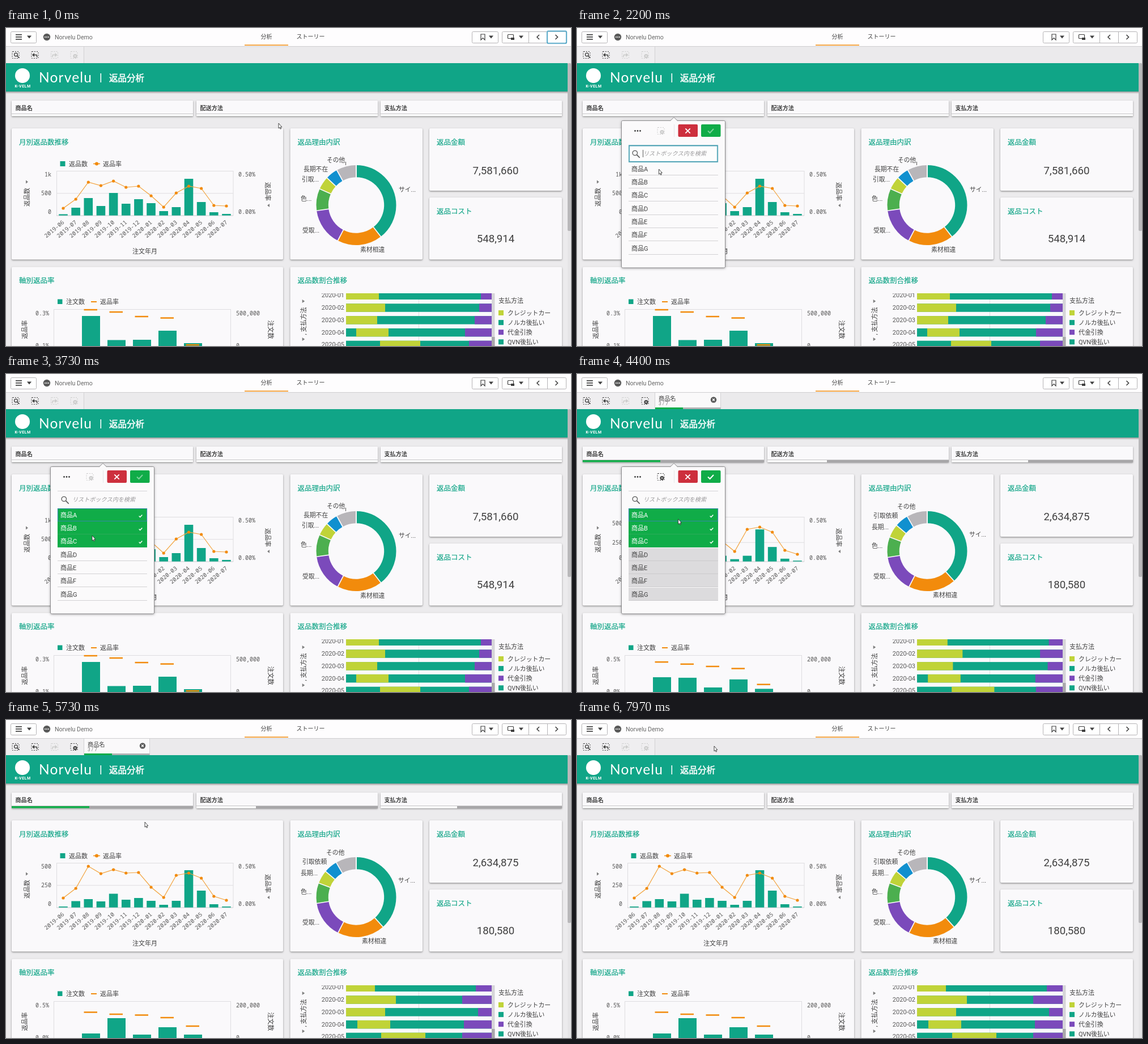
These frames come from a looping animation (997x561 px, 8000 ms). An HTML page with a canvas:

```html
<!DOCTYPE html>
<html lang="ja">
<head>
<meta charset="utf-8">
<title>返品分析</title>
<style>
html, body { margin: 0; width: 100%; height: 100%; overflow: hidden; background: #ecebed; }
canvas { display: block; width: 997px; height: 561px; }
</style>
</head>
<body>
<canvas id="stage" width="997" height="561"></canvas>
<script>
const ctx = document.getElementById('stage').getContext('2d');
const LOOP = 8000;
const SANS = 'Roboto, "Noto Sans CJK JP", "Noto Sans CJK", sans-serif';
const MONO = '"Noto Sans Mono", monospace';
const BRAND = 'Lato, sans-serif';
const GREEN = '#10a587', ORANGE = '#f28b0c', PURPLE = '#7b4abb', LIME = '#c0d338';
const PICK = '#10ac48', INK = '#404040', SOFT = '#595959', CARD = '#faf9fb', GRID = '#dedde0';

// Moments of the interaction, in ms
const T = { blur: 900, open: 970, list: 1200, pickA: 3020, pickB: 3450, pickC: 3680,
  apply: 4000, top: 4060, bottom: 4220, close: 5080, hoverOn: 5900, hoverOff: 6450, clear: 7680 };

const PATH = [[0, 481, 168], [180, 481, 168], [820, 143, 134], [1300, 143, 134], [2130, 144.5, 249],
  [3370, 144.5, 249], [3690, 152, 285], [4200, 152, 285], [4780, 248, 180], [5450, 248, 180],
  [5750, 245, 180], [6380, 245, 180], [6660, 241, 41], [7740, 241, 41], [7900, 242, 46]];

const combo = {
  barA: [328.5, 317, 300, 314, 291, 310, 302, 309, 323, 316, 266, 307, 325, 328],
  barB: [329, 319.5, 316, 320, 306.5, 317, 314, 319, 326, 319, 265, 301, 325, 329],
  lineA: [318, 302, 272, 278, 270, 281, 279, 296, 316, 291, 279, 283, 313, 314],
  lineB: [314, 297, 258, 271, 264, 270, 269, 295, 313, 274, 270, 279, 311, 318]
};
const axisBars = {
  barA: [508, 550.5, 550, 534, 556], barB: [553, 526, 555, 542, 555],
  markA: [497, 501, 509, 511.5, 559], markB: [515.5, 519, 520.5, 525, 540]
};
const stackA = [[600, 658, 838], [600, 669, 835], [600, 655, 827], [618, 675, 810], [660, 731, 817]];
const stackB = [[600, 651, 829], [600, 688, 805], [600, 669, 833], [620, 678, 808], [662, 740, 805]];
const pieA = [0, 142, 207.5, 262, 294, 313, 331, 360];
const pieB = [0, 138, 207, 261, 290.5, 310, 330, 360];
const pieColors = [GREEN, ORANGE, PURPLE, '#4caf4f', LIME, '#1190cf', '#b8b6ba'];
const pieTextA = [['その他', 566, 233], ['長期不在', 525, 249], ['引取...', 522, 267], ['色...', 520, 301],
  ['受取...', 523, 357], ['素材相違', 625, 391], ['サイ...', 693, 285]];
const pieTextB = [['その他', 565, 234], ['引取依頼', 523, 250], ['長期...', 520, 270], ['色...', 520, 303],
  ['受取...', 523, 357], ['素材相違', 628, 390], ['サイ...', 692, 283]];

const mix = (a, b, k) => a + (b - a) * k;
const ramp = (t, start, len) => Math.max(0, Math.min(1, (t - start) / len));
const ease = k => k * k * (3 - 2 * k);

function rect(x, y, w, h, color) {
  ctx.fillStyle = color;
  ctx.fillRect(x, y, w, h);
}

function box(x, y, w, h, r, fill, stroke, lw = 1) {
  ctx.beginPath();
  ctx.roundRect(x, y, w, h, r);
  if (fill) { ctx.fillStyle = fill; ctx.fill(); }
  if (stroke) { ctx.strokeStyle = stroke; ctx.lineWidth = lw; ctx.stroke(); }
}

function disc(x, y, r, color) {
  ctx.beginPath();
  ctx.arc(x, y, r, 0, Math.PI * 2);
  ctx.fillStyle = color;
  ctx.fill();
}

function line(points, color, lw = 1) {
  ctx.beginPath();
  points.forEach(([x, y]) => ctx.lineTo(x, y));
  ctx.strokeStyle = color;
  ctx.lineWidth = lw;
  ctx.stroke();
}

function poly(points, color) {
  ctx.beginPath();
  points.forEach(([x, y]) => ctx.lineTo(x, y));
  ctx.closePath();
  ctx.fillStyle = color;
  ctx.fill();
}

// y is the vertical middle of the text
function text(s, x, y, size, o = {}) {
  ctx.font = `${o.style || ''} ${o.weight || 400} ${size}px ${o.font || SANS}`;
  ctx.textAlign = o.align || 'left';
  ctx.letterSpacing = (o.gap || 0) + 'px';
  ctx.fillStyle = ctx.strokeStyle = o.color || INK;
  ctx.fillText(s, x, y + size * 0.37);
  if (o.thick) {
    ctx.lineWidth = o.thick;
    ctx.strokeText(s, x, y + size * 0.37);
  }
}

function turned(s, x, y, size, deg, o = {}) {
  ctx.save();
  ctx.translate(x, y);
  ctx.rotate(deg * Math.PI / 180);
  text(s, 0, 0, size, { align: 'center', ...o });
  ctx.restore();
}

const caret = (x, y, dx, color = '#808080') => poly([[x - dx, y - 3], [x + dx, y], [x - dx, y + 3]], color);
const drop = (x, y) => poly([[x - 4, y - 2.5], [x + 4, y - 2.5], [x, y + 2.5]], INK);
const cross = (x, y, r, color, lw) => {
  line([[x - r, y - r], [x + r, y + r]], color, lw);
  line([[x + r, y - r], [x - r, y + r]], color, lw);
};
const check = (x, y, s, color, lw) => line([[x - s, y], [x - s * 0.3, y + s * 0.7], [x + s, y - s * 0.7]], color, lw);

function shadowed(x, y, w, h, r = 2) {
  ctx.save();
  ctx.shadowColor = 'rgba(0,0,0,.42)';
  ctx.shadowBlur = 3;
  ctx.shadowOffsetY = 1.2;
  box(x, y, w, h, r, CARD);
  ctx.restore();
}

function card(x, y, w, h, title) {
  shadowed(x, y, w, h);
  text(title, x + 13, y + 24, 12.5, { color: GREEN, thick: 0.2 });
}

function lens(x, y, r, color) {
  ctx.beginPath();
  ctx.arc(x, y, r, 0, Math.PI * 2);
  ctx.strokeStyle = color;
  ctx.lineWidth = 1.3;
  ctx.stroke();
  line([[x + r * 0.7, y + r * 0.7], [x + r * 2, y + r * 2]], color, 1.6);
}

function dashed(x, y, color) {
  ctx.setLineDash([2, 2]);
  box(x - 6, y - 6, 12, 12, 1, null, color, 1);
  ctx.setLineDash([]);
}

function clearIcon(x, y, on) {
  const color = on ? INK : '#cbcbcb';
  dashed(x, y, color);
  disc(x + 2, y + 2, 3.6, color);
  cross(x + 2, y + 2, 1.4, '#f4f4f4', 1);
}

function stepIcon(x, y, dir, color) {
  dashed(x, y, color);
  rect(x - 4, y - 3, 9, 7, '#ededed');
  line([[x - 2 * dir, y], [x + 3 * dir, y], [x + 4 * dir, y + 4]], color, 1.5);
  poly([[x - 5 * dir, y], [x - dir, y - 3.5], [x - dir, y + 3.5]], color);
}

function expandIcon(x, y) {
  for (const d of [1, -1]) {
    line([[x + 2.2 * d, y - 2.2 * d], [x + 5 * d, y - 5 * d]], INK, 1.3);
    poly([[x + 6 * d, y - 6 * d], [x + 6 * d, y - 2.5 * d], [x + 2.5 * d, y - 6 * d]], INK);
  }
}

function drawHeader(t, filtered) {
  rect(0, 0, 997, 32, '#fefdfe');
  rect(0, 32, 997, 1, '#cfced0');
  const edge = '#b5b4b6';
  box(8.5, 6.5, 45, 20, 2, '#fff', edge);
  for (const y of [11, 15, 19]) rect(17, y, 11, 1.7, INK);
  drop(41, 16);
  disc(72, 16, 6.2, SOFT);
  for (const x of [69, 72, 75]) disc(x, 16, 1, '#fff');
  text('Norvelu Demo', 86, 16, 10.6, { color: '#666' });
  text('分析', 459.5, 15.5, 10, { align: 'center' });
  text('ストーリー', 537.5, 15.5, 10, { align: 'center' });
  rect(421, 29.5, 77, 1.5, ORANGE);

  box(822.5, 6.5, 46, 20, 2, '#fff', edge);
  ctx.lineJoin = 'miter';
  line([[838, 11], [845, 11], [845, 21], [841.5, 17.5], [838, 21], [838, 10.5]], INK, 1.2);
  drop(856, 16);
  box(875.5, 6.5, 113, 20, 2, '#fff', edge);
  rect(922, 7, 1, 19, edge);
  rect(955, 7, 1, 19, edge);
  box(885.5, 11.5, 10, 7, 1, null, INK, 1.2);
  rect(891, 17, 6, 4, INK);
  drop(909, 16);
  line([[941, 12], [937, 16], [941, 20]], INK, 1.6);
  line([[969.5, 12], [973.5, 16], [969.5, 20]], INK, 1.6);
  if (t < T.blur) {
    box(955, 5.5, 34, 21.5, 2, null, '#a9d4e6', 2.4);
    box(955, 5.5, 34, 21.5, 2, null, '#3797b9', 1.2);
  }

  rect(0, 33, 997, 29, '#ebeaec');
  rect(0, 33, 137, 29, '#efeef0');
  rect(137, 33, 1, 29, '#d2d1d3');
  dashed(17, 47.5, INK);
  lens(17.5, 47, 2.8, INK);
  stepIcon(51, 47.5, 1, INK);
  stepIcon(85.5, 47.5, -1, '#cbcbcb');
  clearIcon(120, 47.5, filtered);
  if (filtered) {
    rect(138, 33, 115.5, 29, '#faf9fa');
    rect(253, 33, 1, 29, '#d2d1d3');
    text('商品名', 144, 43, 10.2);
    text('3 / 7', 144, 52, 8.4, { color: '#777' });
    disc(241, 45.5, 5.2, SOFT);
    cross(241, 45.5, 2, '#fff', 1.3);
    rect(138, 59, 49.5, 3, PICK);
    rect(187.5, 59, 66, 3, '#b3b2b4');
  }
}

function drawBanner() {
  rect(0, 62, 991, 50, GREEN);
  const shade = ctx.createLinearGradient(0, 112, 0, 116);
  shade.addColorStop(0, 'rgba(0,0,0,.35)');
  shade.addColorStop(1, 'rgba(0,0,0,0)');
  rect(0, 112, 991, 4, shade);
  disc(29, 84, 13, '#fff');
  text('K-VELM', 29.5, 102, 7, { color: '#fff', align: 'center', weight: 700, gap: 0.5 });
  text('Norvelu', 58, 87, 24.5, { color: '#fff', font: BRAND, gap: 1.2 });
  rect(166.5, 80, 1.6, 16, '#fff');
  text('返品分析', 182, 88, 15.5, { color: '#fff', thick: 0.5 });
  rect(991, 62, 6, 499, '#e6e5e7');
  box(991, 62, 6, 296, 2, '#b9b8ba');
}

function drawFilters(t, filtered) {
  [['商品名', 10, 147], ['配送方法', 336, 441], ['支払方法', 661, 796]].forEach(([name, x, split], i) => {
    shadowed(x, 128, 320, 27.5, 1);
    text(name, x + 6.5, 141, 10.1, { weight: 700 });
    rect(x, 151, 320, 1, '#c4c3c5');
    rect(x, 152, 320, 3, '#fff');
    if (filtered) {
      rect(split, 152, x + 320 - split, 4, '#a7a6a8');
      rect(x, 152, split - x, 3.5, i ? '#fdfdfd' : PICK);
    }
  });
  if (t > 720 && t < 1180) expandIcon(965.5, 137);
}

function drawCombo(t, k) {
  card(10, 177, 479, 231.5, '月別返品数推移');
  rect(95.5, 235, 9, 9, GREEN);
  text('返品数', 111, 239.5, 11);
  line([[154, 239.5], [166, 239.5]], ORANGE, 1.5);
  disc(160, 239.5, 3, ORANGE);
  text('返品率', 171, 239.5, 11);

  // The value axis keeps some headroom until the selection is confirmed
  const fit = mix(1, 0.86, k * (1 - ease(ramp(t, T.close + 60, 320))));
  const level = part => 331 - 78.5 * fit * part;
  line([[89, 252.5], [401, 252.5]], GRID);
  line([[89, level(0.5)], [401, level(0.5)]], GRID);
  for (const x of [89.5, 401]) line([[x, 252], [x, 331]], GRID);
  line([[89, 331], [401, 331]], '#cbcacd');
  const axis = { font: MONO, color: SOFT };
  (k > 0 ? ['500', '250', '0'] : ['1k', '500', '0']).forEach((s, i) => {
    const y = Math.min(324, Math.max(258.5, level(1 - i / 2)));
    text(s, 80, y, 10, { ...axis, align: 'right' });
  });
  text('0.50%', 410, 258.5, 10, axis);
  text('0.00%', 410, 324, 10, axis);
  turned('返品数', 37, 298.5, 11, -90);
  turned('返品率', 462, 288.5, 11, 90);
  caret(37, 271.5, 2);
  caret(463, 313, -2);

  const pts = combo.lineA.map((y, i) => [101 + i * 22.15, mix(y, combo.lineB[i], k)]);
  pts.forEach(([x], i) => {
    const h = (330.7 - mix(combo.barA[i], combo.barB[i], k)) * fit;
    rect(x - 7.8, 330.7 - h, 15.6, h, GREEN);
    const month = (i + 5) % 12 + 1;
    const label = (i < 7 ? '2019-' : '2020-') + String(month).padStart(2, '0');
    turned(label, x, 341, 10, -40, { ...axis, align: 'right' });
  });
  line(pts, '#f3a23d', 1.2);
  pts.forEach(([x, y]) => disc(x, y, 2.6, ORANGE));
  text('注文年月', 245, 393.5, 11, { align: 'center' });

  if (t > T.hoverOn && t < T.hoverOff) {
    disc(419.5, 191, 6, INK);
    rect(418.6, 190, 1.9, 4.5, '#fff');
    disc(419.5, 188, 1.1, '#fff');
    box(441, 187, 12.5, 9, 1, INK);
    rect(444.5, 185.5, 5, 2, INK);
    disc(447.2, 191.5, 3, '#fff');
    disc(447.2, 191.5, 1.6, INK);
    expandIcon(474.5, 191);
  }
}

function drawPie(k) {
  card(501.5, 177, 233.5, 231.5, '返品理由内訳');
  const cx = 618, cy = 312.5;
  const ends = pieA.map((a, i) => (mix(a, pieB[i], k) - 90) * Math.PI / 180);
  pieColors.forEach((color, i) => {
    ctx.beginPath();
    ctx.arc(cx, cy, 70.5, ends[i], ends[i + 1]);
    ctx.arc(cx, cy, 49.2, ends[i + 1], ends[i], true);
    ctx.fillStyle = color;
    ctx.fill();
  });
  for (const a of ends) {
    const c = Math.cos(a), s = Math.sin(a);
    line([[cx + 48 * c, cy + 48 * s], [cx + 72 * c, cy + 72 * s]], CARD, 1.7);
  }
  (k > 0 ? pieTextB : pieTextA).forEach(([s, x, y]) => text(s, x, y, 10.8));
  if (k === 0) line([[599.5, 236], [599.5, 242]], SOFT);
}

function drawNumbers(after) {
  card(747, 177, 234, 110, '返品金額');
  card(747, 299, 234, 109.5, '返品コスト');
  text(after ? '2,634,875' : '7,581,660', 864, 251.5, 18.7, { align: 'center' });
  text(after ? '180,580' : '548,914', 864, 371.5, 18.7, { align: 'center' });
}

function drawAxisBars(k) {
  card(10, 421.5, 479, 150, '軸別返品率');
  rect(91, 478.5, 8.5, 8.5, GREEN);
  text('注文数', 106, 483, 11);
  rect(150, 482, 10, 2, ORANGE);
  text('返品率', 166, 483, 11);
  line([[84, 496.5], [397, 496.5]], GRID);
  for (const x of [84.5, 396.5]) line([[x, 496], [x, 561]], GRID);
  const axis = { font: MONO, color: SOFT };
  const b = k > 0;
  text(b ? '0.5%' : '0.3%', 76, 503, 10, { ...axis, align: 'right' });
  text(b ? '0.0%' : '0.1%', 76, 560, 10, { ...axis, align: 'right' });
  text(b ? '200,000' : '500,000', 406, 503, 10, axis);
  text('0', 406, 560, 10, axis);
  turned('返品率', 33, 532, 11, -90);
  turned('注文数', 467, 532, 11, 90);
  axisBars.barA.forEach((y, i) => {
    const x = 134 + i * 45;
    rect(x, mix(y, axisBars.barB[i], k), 32, 70, GREEN);
    const my = mix(axisBars.markA[i], axisBars.markB[i], k);
    rect(x + 3.5, my - 1.2, 23.5, 2.5, ORANGE);
  });
}

function drawStacks(k) {
  card(501.5, 421.5, 479.5, 150, '返品数割合推移');
  ctx.save();
  ctx.beginPath();
  ctx.rect(540, 468, 324, 93);
  ctx.clip();
  line([[728.5, 468], [728.5, 561]], GRID);
  stackA.forEach((row, i) => {
    const y = 464.5 + i * 21.8, h = 14.5;
    const [a, b, c] = row.map((x, j) => mix(x, stackB[i][j], k));
    rect(600, y, 257, h, GREEN);
    rect(a, y, b - a, h, LIME);
    rect(c, y, 857 - c, h, PURPLE);
    text('2020-0' + (i + 1), 597, y + 6.7, 11, { align: 'right', color: SOFT });
  });
  ctx.restore();
  rect(857, 468, 5.5, 93, '#d6d5d8');
  rect(857, 545, 5.5, 16, '#a9a8ab');
  turned(', 支払方法', 525, 517, 11, -90);
  caret(525, 482, 2.3);
  caret(525, 549, 2.3);
  text('支払方法', 869, 480.5, 11);
  [['クレジットカー', LIME], ['ノルカ後払い', GREEN], ['代金引換', PURPLE], ['QVN後払い', GREEN]].forEach(([s, c], i) => {
    const y = 502.5 + i * 17.1;
    rect(869, y - 4.5, 9, 9, c);
    text(s, 885, y, 10.9);
  });
}

// Shadow outside the panel only, so that it does not darken a translucent panel
function panelShadow(x, y, w, h) {
  ctx.save();
  ctx.beginPath();
  ctx.rect(0, 0, 997, 561);
  ctx.rect(x, y, w, h);
  ctx.clip('evenodd');
  ctx.shadowColor = 'rgba(0,0,0,.4)';
  ctx.shadowBlur = 4;
  ctx.shadowOffsetY = 1;
  box(x, y, w, h, 2, '#fff');
  ctx.restore();
}

function drawPopover(t) {
  const alpha = ramp(t, T.open, 200) * (1 - ramp(t, T.close, 160));
  if (!alpha) return;
  const applied = t >= T.apply;
  ctx.save();
  ctx.globalAlpha = alpha;
  panelShadow(78.5, 163.5, 183, 259.5);
  box(78.5, 163.5, 183, 259.5, 2, '#fbfafb', '#8f8e90');
  poly([[164.5, 164.2], [171, 157.5], [177.5, 164.2]], '#fbfafb');
  line([[164.5, 163.7], [171, 157.5], [177.5, 163.7]], '#8f8e90');

  for (const x of [102.5, 107, 111.5]) disc(x, 181.5, 1.4, INK);
  clearIcon(148, 181.5, applied);
  rect(171, 170, 1, 22, '#e6e5e7');
  box(178.5, 170, 34.5, 22, 2, '#cd2f3d');
  cross(195.5, 181.5, 4.2, '#fff', 1.8);
  box(219, 170, 34.5, 22, 2, t > 4700 ? '#1ab455' : PICK);
  check(236, 181.5, 5, applied ? '#fff' : 'rgba(255,255,255,.45)', 2);

  rect(91, 206, 158, 1, '#d5d4d6');
  if (t < T.pickA) {
    box(92, 207.5, 156, 28.5, 0, '#fdfdfd', '#b5dbe3', 2.5);
    box(92, 207.5, 156, 28.5, 0, null, '#3c98ac', 1.3);
    if (t < 2600) rect(116, 215, 1, 13, SOFT);
  }
  lens(102.3, 220.5, 4.2, SOFT);
  text('リストボックス内を検索', 117, 221.5, 10.1, { style: 'italic', color: '#9a999b' });

  const picks = [T.pickA, T.pickB, T.pickC];
  if (t >= T.list) [...'ABCDEFG'].forEach((c, i) => {
    const y = Math.round(236.7 + i * 23.35);
    const picked = t >= picks[i];
    if (picked) rect(91, y, 158, 23, PICK);
    else if (applied) rect(91, y, 158, 23, '#dcdbdd');
    rect(91, y + 22, 158, 1, picked ? '#2bad5a' : applied ? '#cbcacc' : '#d3d2d4');
    text('商品' + c, 96, y + 11.8, 11, { color: picked ? '#fff' : INK });
    if (picked) check(237.5, y + 13.5, 2.8, '#fff', 1.5);
  });
  if (t >= T.pickA) box(91.5, 237.5, 157, 22, 0, null, '#3588a8', 1.2);
  ctx.restore();
}

function drawCursor(t) {
  let i = PATH.findIndex(p => p[0] > t);
  if (i < 0) i = PATH.length;
  const a = PATH[i - 1], b = PATH[i] || a;
  const k = b === a ? 0 : ease(ramp(t, a[0], b[0] - a[0]));
  const x = mix(a[1], b[1], k), y = mix(a[2], b[2], k);
  const hand = (t > 780 && t < 1380) || (t > 4690 && t < T.close + 120) || (t > 6610 && t < T.clear);
  ctx.save();
  ctx.translate(x, y);
  ctx.lineJoin = 'round';
  ctx.beginPath();
  const shape = hand
    ? [[0, 0], [1.6, 0], [2, 4], [6, 5], [6.3, 8.5], [5, 12], [0, 12], [-3.4, 7.5], [-2.5, 6.3], [-0.4, 7.5]]
    : [[0, 0], [0, 9], [2, 7.4], [3.3, 10.2], [4.6, 9.6], [3.4, 6.8], [5.8, 6.6]];
  shape.forEach(p => ctx.lineTo(...p));
  ctx.closePath();
  ctx.fillStyle = '#fff';
  ctx.fill();
  ctx.strokeStyle = '#333';
  ctx.lineWidth = 0.9;
  ctx.stroke();
  ctx.restore();
}

function draw(t) {
  const filtered = t >= T.apply && t < T.clear;
  const top = ease(ramp(t, T.top, 320));
  const bottom = ease(ramp(t, T.bottom, 320));
  rect(0, 0, 997, 561, '#ecebed');
  drawHeader(t, filtered);
  drawBanner();
  drawFilters(t, filtered);
  drawCombo(t, top);
  drawPie(top);
  drawNumbers(top > 0);
  drawAxisBars(bottom);
  drawStacks(bottom);
  drawPopover(t);
  drawCursor(t);
}

const start = performance.now();
function tick() {
  draw((performance.now() - start) % LOOP);
  requestAnimationFrame(tick);
}
tick();
</script>
</body>
</html>
```
